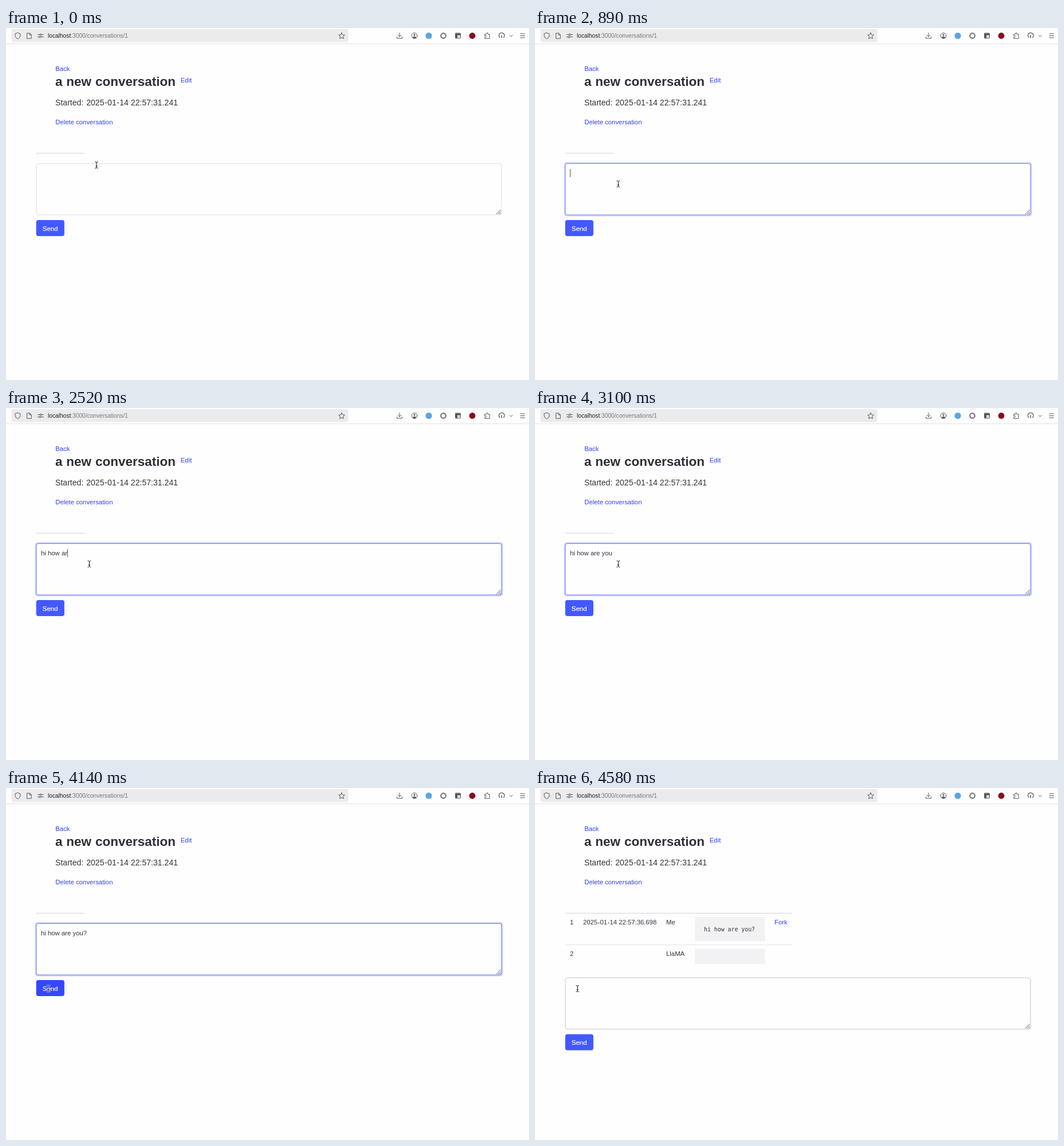
Animation, 913 px wide and 614 px high, one loop 8 s. Source, as an HTML page:

```html
<!DOCTYPE html>
<html lang="en">
<head>
<meta charset="utf-8">
<title>Conversation</title>
<style>
  html, body { margin: 0; width: 100%; height: 100%; overflow: hidden; background: #fefefe; }
  svg { display: block; width: 100vw; height: 100vh; }
  text { font: 11.35px "Liberation Sans", Arial, sans-serif; fill: #30343c; white-space: pre; }
  .link { fill: #3040f4; }
  .icon { fill: none; stroke: #55555e; stroke-width: 1; stroke-linecap: round; stroke-linejoin: round; }
  .rule { fill: none; stroke: #d3d4d8; }
</style>
</head>
<body>
<svg viewBox="0 0 913 614">
  <rect width="913" height="614" fill="#fefefe"/>

  <g id="toolbar">
    <path d="M0 27.5H913" stroke="#e3e3e6"/>
    <rect x="9.5" y="2" width="588" height="22.5" rx="3" fill="#ebebed"/>
    <text x="73" y="17.3" style="font-size:10.2px;fill:#77777f"><tspan fill="#202026">localhost</tspan>:3000/conversations/1</text>
    <g class="icon">
      <path d="M20.5 8.5 25 10.2V13.2Q25 17 20.5 19 16 17 16 13.2V10.2Z"/>
      <path d="M37 9H41.3L44.3 12V18.3H37ZM41.3 9V12H44.3"/>
      <path d="M55.5 11.6H59M62.5 11.6H65.5M55.5 15.6H57.5M61 15.6H65.5"/>
      <circle cx="60.8" cy="11.6" r="1.5"/>
      <circle cx="59.2" cy="15.6" r="1.5"/>
      <path id="star"/>
      <path d="M687 8.5V15M684 12.3 687 15.3 690 12.3M682.5 15.5V18H691.5V15.5"/>
      <circle cx="713" cy="13.5" r="4.9"/>
      <path d="M710.3 16.9Q710.5 15 713 15 715.5 15 715.7 16.9Z" fill="#55555e"/>
      <circle cx="713" cy="12" r="1.6" fill="#55555e" stroke="none"/>
      <circle cx="763.5" cy="13.5" r="4.3" stroke="#77777d" stroke-width="2.2"/>
      <rect x="784.5" y="9" width="9" height="9" rx="1"/>
      <path d="M785 9.5H793V12.8H788V17.5H785Z" fill="#55555e" stroke="none"/>
      <path d="M788 15.2H793" stroke-width=".6"/>
      <path d="M835.8 11H838.7V9.8Q838.7 8.4 840 8.4 841.3 8.4 841.3 9.8V11H844.2V18.3H835.8V15.9H837Q838.4 15.9 838.4 14.6 838.4 13.3 837 13.3H835.8Z"/>
      <path d="M861.8 16.5A4.8 4.8 0 1 1 868.8 16.5M865.3 13V17" stroke-width="1.4"/>
      <path d="M879.5 12.7 881.8 15 884.1 12.7"/>
      <path d="M898 10H905.5M898 13.5H905.5M898 17H905.5"/>
    </g>
    <circle cx="738" cy="13.5" r="5.6" fill="#5ba4e2"/>
    <circle cx="814" cy="13.5" r="5.4" fill="#8a0a1e"/>
  </g>

  <text class="link" x="86.2" y="74.5">Back</text>
  <text y="100.6" style="font-size:22.5px;font-weight:bold;fill:#2b2f37"><tspan x="86">a</tspan> <tspan x="105.3">new</tspan> <tspan x="156">conversation</tspan></text>
  <text class="link" x="304.8" y="95.4">Edit</text>
  <text y="135.4" style="font-size:14.1px"><tspan x="86">Started:</tspan> <tspan class="date" x="140.2">2025-01-14</tspan> 22:57:31.241</text>
  <text class="link" x="86.2" y="168.4">Delete conversation</text>

  <path id="topRule" class="rule"/>
  <g id="messages">
    <path class="rule" d="M52.5 273.6H449.5" style="stroke:#e3e4e7"/>
    <rect x="279" y="225" width="122.5" height="42.3" fill="#f2f2f5"/>
    <rect x="279" y="280" width="122.5" height="27.3" fill="#f2f2f5"/>
    <text x="61" y="237.8">1</text>
    <text x="84" y="237.8" style="font-size:11.3px"><tspan class="date">2025-01-14</tspan> 22:57:36.698</text>
    <text x="229" y="237.8">Me</text>
    <text x="295" y="249.8" style="font:9.87px 'DejaVu Sans Mono',monospace">hi how are you?</text>
    <text class="link" x="418" y="237.8">Fork</text>
    <text x="61" y="292.8">2</text>
    <text x="229" y="292.8">LlaMA</text>
  </g>

  <g id="form">
    <rect id="ring" x="50.6" y="234" width="816.9" height="94.5" rx="5" fill="#cdd2ff"/>
    <rect id="box" x="53" y="236.5" width="812" height="89.5" rx="3.4" fill="#fefefe" stroke-width=".9"/>
    <path d="M855.8 324.8 863.6 317M859.2 324.8 863.6 320.4M862 324.8 863.6 323.2" stroke="#55555a"/>
    <text id="draft" x="61" y="257.4"></text>
    <rect id="caret" y="246" width="1" height="14" fill="#50545c"/>
    <rect id="button" x="52.7" y="335" width="49.2" height="28" rx="4"/>
    <text x="63.7" y="353.6" style="font-size:11.55px;fill:#fff;stroke:#fff;stroke-width:.2">Send</text>
  </g>

  <g id="pointer" fill="none" stroke-linecap="round">
    <path id="halo" stroke="#fff" stroke-width="2"/>
    <path id="beam" stroke="#111"/>
  </g>
</svg>
<script>
const LOOP = 8000;
const $ = id => document.getElementById(id);
const set = (id, attrs) => {
  for (const key in attrs) $(id).setAttribute(key, attrs[key]);
};
const show = (id, on) => set(id, { visibility: on ? "visible" : "hidden" });

const type = (text, caret = true) => ({ text, caret });
const move = (x, y) => ({ x, y });

// Each step changes part of the state and holds until the next one.
const steps = [
  [0, { ...move(158, 239), ...type("", false), edge: "#d9dbdf", ring: false, fill: "#4359ff", sent: false }],
  [150, { ...move(151.6, 259), edge: "#c0c2c8" }],
  [290, move(147, 272)],
  [440, move(145.4, 272)],
  [890, { caret: true, ring: true, edge: "#6d79f6" }],
  [1040, { edge: "#5f6cfb" }],
  [1490, { caret: false }],
  [1790, type("hi")],
  [1930, type("hi ")],
  [2080, type("hi ho")],
  [2220, type("hi how")],
  [2370, type("hi how ")],
  [2520, type("hi how ar")],
  [2660, type("hi how are y")],
  [2810, type("hi how are yo")],
  [2960, type("hi how are you")],
  [3100, { caret: false }],
  [3400, type("hi how are you?")],
  [3700, { caret: false, ...move(145.4, 277.4) }],
  [3850, move(128.7, 346)],
  [4000, move(98.7, 350)],
  [4140, { ...move(74.2, 350), fill: "#3547ff" }],
  [4290, { ring: false, fill: "#2a3bff" }],
  [4430, { ...type("", false), sent: true, edge: "#d9dbdf", fill: "#4359ff" }],
  [4580, { edge: "#bdbfc4" }]
];

function stateAt(time) {
  const state = {};
  for (const [start, change] of steps) {
    if (time >= start) Object.assign(state, change);
  }
  return state;
}

function draw(time) {
  const s = stateAt(time);
  $("draft").textContent = s.text;
  set("caret", { x: Math.round(61 + (s.text ? $("draft").getComputedTextLength() : 0)) });
  show("caret", s.caret);
  show("ring", s.ring);
  show("messages", s.sent);
  set("box", { stroke: s.edge });
  set("button", { fill: s.fill });
  set("topRule", { d: `M52.5 218.4H${s.sent ? 449.5 : 137}` });
  set("form", { transform: `translate(0 ${s.sent ? 94.6 : 0})` });
  set("pointer", { transform: `translate(${s.x} ${s.y})` });
}

// Dates get a little air around their hyphens.
for (const date of document.querySelectorAll(".date")) {
  const air = part => `<tspan dx=".028em">${part}</tspan>`;
  date.innerHTML = date.textContent.split("-").join(air("-") + "\0")
    .replace(/\0(\d+)/g, (_, digits) => air(digits));
}

const starPoints = Array.from({ length: 10 }, (_, i) => {
  const r = i % 2 ? 2.7 : 5.6, a = i * Math.PI / 5;
  return `${586 + r * Math.sin(a)} ${14 - r * Math.cos(a)}`;
});
set("star", { d: `M${starPoints.join("L")}Z` });

const beam = "M-2.4-5.4Q-.3-5.4 0-4.3 .3-5.4 2.4-5.4M0-4.3V4.3M-2.4 5.4Q-.3 5.4 0 4.3 .3 5.4 2.4 5.4M-1.2 1.8H1.2";
set("halo", { d: beam });
set("beam", { d: beam });

const start = performance.now();
function tick() {
  draw((performance.now() - start) % LOOP);
  requestAnimationFrame(tick);
}
tick();
</script>
</body>
</html>
```
